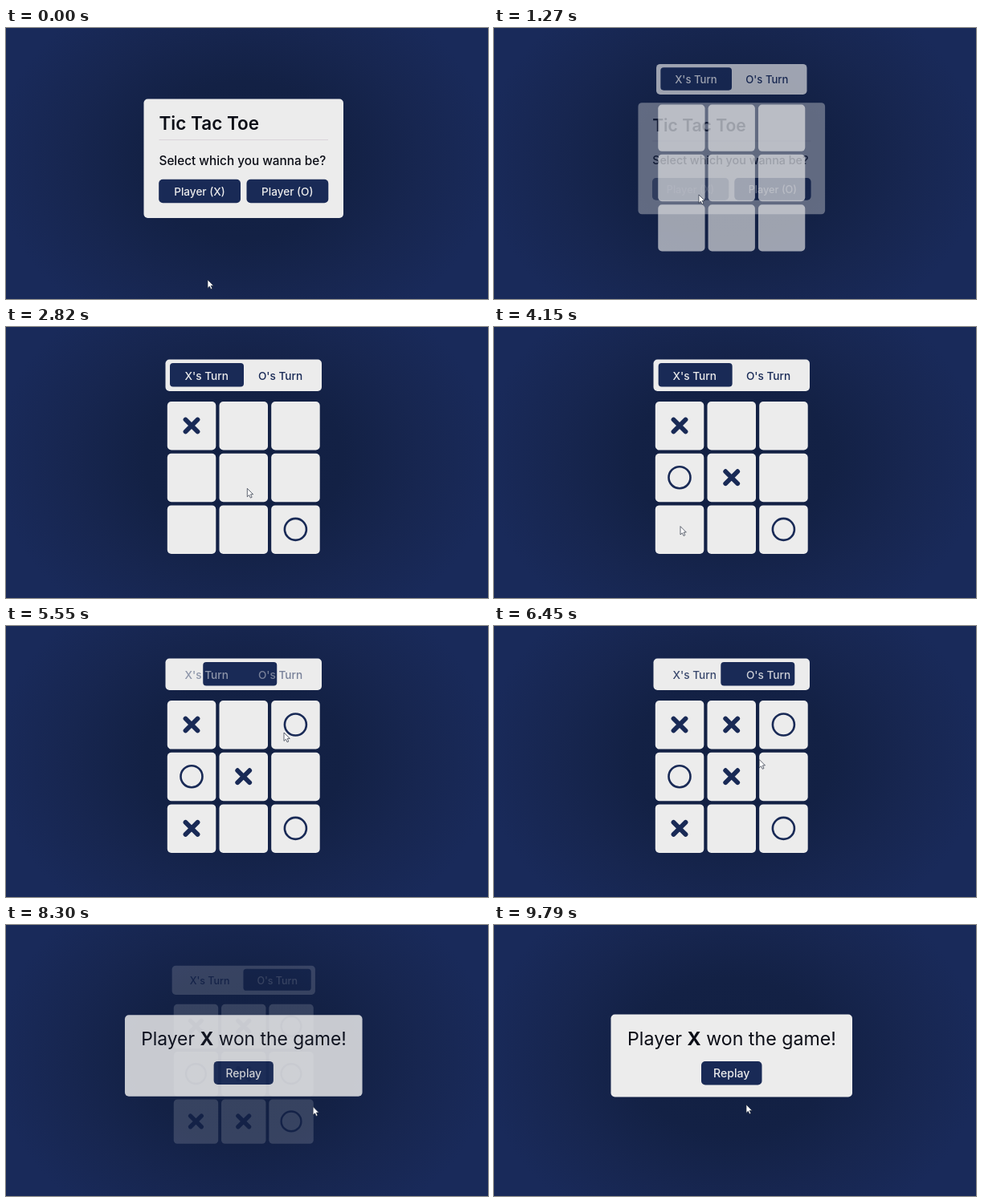
Write an HTML page that moves like this. It is 600x338 px and loops after 9850 ms.

```html
<!DOCTYPE html>
<html lang="en">
<head>
<meta charset="utf-8">
<title>Tic Tac Toe</title>
<style>
  html, body { margin: 0; width: 100%; height: 100%; overflow: hidden; background: #192a58; }
  svg { display: block; width: 600px; height: 338px; font-family: Inter, sans-serif; font-weight: 500; }
  .panel { fill: #ececec; }
  .navy { fill: #192a56; }
  .ink { fill: #0b0d16; }
  .mid { text-anchor: middle; }
  .mark { fill: none; stroke: #192a56; }
</style>
</head>
<body>
<svg viewBox="0 0 600 338">
  <defs>
    <radialGradient id="glow" gradientUnits="userSpaceOnUse" cx="0" cy="0" r="1"
      gradientTransform="translate(296 165) scale(310 245)">
      <stop offset="0" stop-color="#122042"/>
      <stop offset=".4" stop-color="#132145"/>
      <stop offset=".7" stop-color="#172650"/>
      <stop offset="1" stop-color="#192a5a"/>
    </radialGradient>
  </defs>
  <rect width="600" height="338" fill="url(#glow)"/>

  <g id="menu">
    <rect class="panel" x="171.5" y="88.5" width="248.5" height="148.5" rx="5"/>
    <text class="ink" x="190.5" y="127" font-size="22.5" font-weight="600">Tic Tac Toe</text>
    <path d="M190.5 139.5H401" stroke="#d9d3d9"/>
    <text class="ink" x="190.5" y="170.5" font-size="15.3">Select which you wanna be?</text>
    <g id="pickX">
      <rect x="190.2" y="188.7" width="101.8" height="29.6" rx="5"/>
      <text class="mid" x="241" y="209" font-size="13.6">Player (X)</text>
    </g>
    <g>
      <rect class="navy" x="299.5" y="188.7" width="101.8" height="29.6" rx="5"/>
      <text class="mid panel" x="350.3" y="209" font-size="13.6">Player (O)</text>
    </g>
  </g>

  <g id="board">
    <rect class="panel" x="198.5" y="40.5" width="194.5" height="39.5" rx="5"/>
    <rect id="slider" class="navy" y="45" width="92" height="29.5" rx="4"/>
    <text id="turnX" class="mid" x="249.7" y="65.5" font-size="13.6">X's Turn</text>
    <text id="turnO" class="mid" x="341.5" y="65.5" font-size="13.6">O's Turn</text>
    <g id="cells"></g>
  </g>

  <g id="win">
    <rect class="panel" x="145.5" y="111.5" width="300.5" height="103" rx="5"/>
    <text class="ink mid" x="296" y="150" font-size="23.2" font-weight="400">Player <tspan font-weight="700">X</tspan> won the game!</text>
    <g id="replay">
      <rect x="258" y="170" width="75.5" height="29.5" rx="5"/>
      <text class="mid" x="295.7" y="190" font-size="14.1">Replay</text>
    </g>
  </g>

  <path id="cursor" d="M0 0V10.4L2.4 8.2 4 11.8 5.8 11 4.2 7.4H7.3Z" fill="#fff" stroke="#222a3c" stroke-width=".7"/>
</svg>

<script>
const LOOP = 9850, FADE = 300, GLIDE = 550, START = 1160, END = 8140;
const WHITE = [236, 236, 236], NAVY = [25, 42, 86];
const $ = id => document.getElementById(id);

// Cells in order of play; X begins and each move takes slightly longer
const moves = [0, 8, 4, 3, 6, 2, 1, 5, 7];
const clickTime = i => 1750 + 667 * i + 14.8 * i * i;
const center = cell => [231 + cell % 3 * 64.7, 123 + Math.floor(cell / 3) * 64.7];

// Pointer glides: [departure time, x, y of destination]
const glides = [
  [-GLIDE, 251, 314], [300, 262, 345], [610, 255, 208],
  ...moves.map((cell, i) => {
    const [x, y] = center(cell);
    return [i ? clickTime(i - 1) : 1270, x + 1, y + 10];
  }),
  [clickTime(8), 405, 217], [8600, 304, 190], [9200, 314, 224]
];

const mix = (a, b, k) => a + (b - a) * k;
const color = (a, b, k) => `rgb(${a.map((v, i) => Math.round(mix(v, b[i], k)))})`;
const bezier = (a, b, s) => 3 * a * s * (1 - s) ** 2 + 3 * b * s * s * (1 - s) + s ** 3;

// CSS "ease" progress of a transition begun at the given time
function ease(t, begin, duration = FADE) {
  const x = Math.min(1, Math.max(0, (t - begin) / duration));
  let lo = 0, hi = 1;
  for (let i = 0; i < 20; i++) {
    const s = (lo + hi) / 2;
    if (bezier(.25, .25, s) < x) lo = s; else hi = s;
  }
  return x === 0 || x === 1 ? x : bezier(.1, 1, lo);
}

const tiles = moves.map((_, cell) => {
  const [x, y] = center(cell);
  return `<rect class="panel" x="${x - 30.2}" y="${y - 30}" width="60.5" height="60.5" rx="5"/>`;
});
const marks = moves.map((cell, i) => {
  const [x, y] = center(cell);
  return i % 2
    ? `<circle class="mark" cx="${x}" cy="${y}" r="13.5" stroke-width="2.6"/>`
    : `<path class="mark" d="M${x - 7.5} ${y - 7.5}l15 15m0-15l-15 15" stroke-width="5.8" stroke-linecap="round"/>`;
});
$('cells').innerHTML = [...tiles, ...marks].join('');
const markNodes = document.querySelectorAll('.mark');

function show(id, k) {
  $(id).setAttribute('opacity', k);
  $(id).setAttribute('transform', `translate(296 162.5) scale(${mix(.9, 1, k)}) translate(-296 -162.5)`);
}

function hover(id, k) {
  const [box, label] = $(id).children;
  box.setAttribute('fill', color(NAVY, WHITE, k));
  label.setAttribute('fill', color(WHITE, NAVY, k));
}

function pointer(t) {
  const i = glides.findLastIndex(([begin]) => begin <= t);
  const [begin, x, y] = glides[i], [, x0, y0] = glides[Math.max(0, i - 1)];
  const k = ease(t, begin, GLIDE);
  return [mix(x0, x, k), mix(y0, y, k)];
}

function draw(t) {
  const opened = ease(t, START), ended = ease(t, END);
  show('menu', 1 - opened);
  show('board', opened - ended);
  show('win', ended);
  hover('pickX', ease(t, 860) - opened);
  hover('replay', ease(t, 8800) - ease(t, 9320));

  let turn = 0;
  markNodes.forEach((mark, i) => {
    turn += (i % 2 ? -1 : 1) * ease(t, clickTime(i));
    mark.setAttribute('visibility', t >= clickTime(i) ? 'visible' : 'hidden');
  });
  $('slider').setAttribute('x', 204 + 92 * turn);
  $('turnX').setAttribute('fill', color(WHITE, NAVY, turn));
  $('turnO').setAttribute('fill', color(NAVY, WHITE, turn));
  $('cursor').setAttribute('transform', `translate(${pointer(t)})`);
}

const origin = performance.now();
function tick() {
  draw((performance.now() - origin) % LOOP);
  requestAnimationFrame(tick);
}
tick();
</script>
</body>
</html>
```
